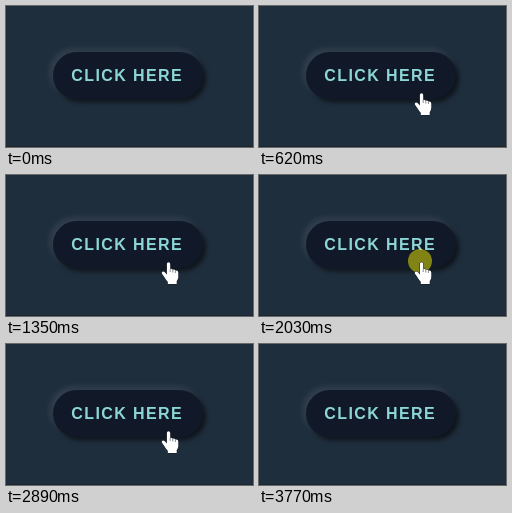
Recreate the animation shown at these times as an HTML page. Size 247x141 px, loop 4830 ms.

```html
<!DOCTYPE html>
<html lang="en">
<head>
<meta charset="utf-8">
<title>Button</title>
<style>
html, body { margin: 0; width: 100%; height: 100%; overflow: hidden; background: #1f2e3d; }
#stage { position: absolute; left: 0; top: 0; width: 247px; height: 141px; overflow: hidden; }
#stage::after { content: ""; position: absolute; left: 0; bottom: 0; width: 100%; height: 1px; background: #1a2530; }
#button {
  position: absolute; left: 47px; top: 46px; width: 150px; height: 47px;
  border-radius: 23.5px; background: #111827;
  box-shadow: 3px 3px 5px rgba(0, 0, 0, .6), -3px -3px 6px rgba(255, 255, 255, .1);
}
#button.down { box-shadow: inset 3px 3px 6px rgba(0, 0, 0, .5), inset -3px -3px 6px rgba(255, 255, 255, .13); }
svg { position: absolute; left: 0; top: 0; }
text { font: bold 16px "Liberation Sans", Arial, sans-serif; letter-spacing: 1.4px; fill: #8cd7d5; }
</style>
</head>
<body>
<div id="stage">
  <div id="button"></div>
  <svg width="247" height="141" viewBox="0 0 247 141">
    <text x="65.3" y="75">CLICK HERE</text>
    <circle id="halo" cx="161" cy="86" r="12" fill="#ff0" fill-opacity=".47"/>
    <g id="hand" stroke="#10161f" stroke-linejoin="round">
      <path d="M5.9 2.3Q5.9 .8 7.5 .8T9.2 2.3V7.4Q10.3 6.7 11.8 8.2Q13.2 7.3 14.4 9.1Q17.2 8.6 17.3 11V15.5Q17.2 17.8 15.7 19.7V22.4H6.8V20.2Q5 18.4 3.8 16.2L1 12.3Q.4 11 1.4 10.3T3.8 10.8L5.9 13Z"
        fill="#fff" stroke-width="1" paint-order="stroke"/>
      <path d="M9.2 7.4V10.5M11.8 8.2V11M14.4 9.1V11.5" fill="none" stroke-width=".5"/>
    </g>
  </svg>
</div>
<script>
const LOOP = 4830, STEP = 70;
const ENTER = 200, ARRIVE = 620, LEAVE = 3770;
const START = [211, 130], REST = [155, 86.5];
const PRESSES = [[960, 1350], [1630, 2030], [2430, 2890], [3240, 3510]];
const HALO_LAG = { 2030: 70 };

const [button, halo, hand] = ["button", "halo", "hand"].map(id => document.getElementById(id));
const show = (el, on) => el.setAttribute("visibility", on ? "visible" : "hidden");
const easeOut = p => 1 - (1 - p) ** 2;

function draw(t) {
  const down = PRESSES.some(([a, b]) => t >= a && t < b);
  const lit = PRESSES.some(([a, b]) => t >= a && t < b + (HALO_LAG[b] || 0));
  button.classList.toggle("down", down);
  show(halo, lit);
  show(hand, t >= ENTER && t < LEAVE);

  const moved = Math.floor((t - ENTER) / STEP) * STEP / (ARRIVE - ENTER);
  const p = easeOut(Math.min(1, Math.max(0, moved)));
  const [x, y] = START.map((s, i) => s + (REST[i] - s) * p);
  hand.setAttribute("transform", `translate(${x} ${y})`);
}

const began = performance.now();
function tick() {
  draw((performance.now() - began) % LOOP);
  requestAnimationFrame(tick);
}
tick();
</script>
</body>
</html>
```
